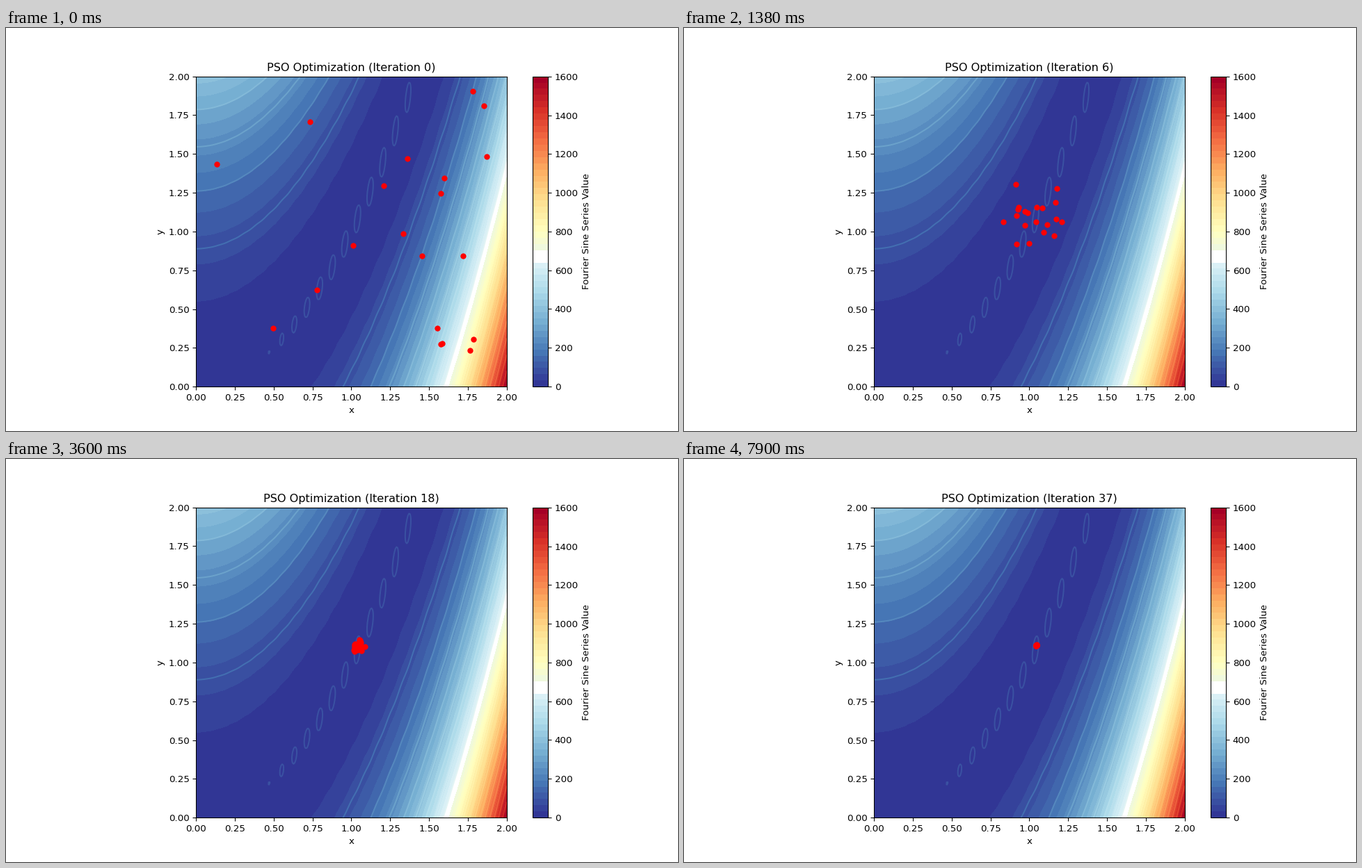
Recreate the animation shown at these times as a matplotlib script. Size 966 by 580 pixels, loop 8000 ms.

```python
import numpy as np
import matplotlib.pyplot as plt
from matplotlib.animation import FuncAnimation
from matplotlib.colors import ListedColormap

LOOP, STEP = 8000, 20
DPI = 96.6
EDGE = 1e-5  # keeps the canvas from rounding down by a pixel
SIZE = (966 + EDGE) / DPI, (580 + EDGE) / DPI

# Where the swarm starts and the point it settles on.
START = np.array([
    (0.134, 1.434), (0.734, 1.705), (1.782, 1.906), (1.853, 1.808),
    (1.871, 1.483), (1.361, 1.472), (1.598, 1.344), (1.576, 1.244),
    (1.211, 1.293), (1.332, 0.984), (1.012, 0.908), (1.453, 0.843),
    (1.721, 0.843), (0.779, 0.623), (0.497, 0.377), (1.553, 0.375),
    (1.587, 0.279), (1.578, 0.272), (1.786, 0.305), (1.764, 0.234)])
BEST = np.array([1.046, 1.111])
SWING = np.random.default_rng(4).uniform(0.25, 0.9, START.shape)


def surface(x, y):
    """Curved valley with a fast ripple that deepens along x."""
    ripple = 0.63 * x * np.cos(2 * np.pi * (x - 0.470) / 0.0814)
    return (1 - x) ** 2 + 100 * (y - x ** 2) ** 2 - ripple


def draw_backdrop(fig):
    """Draw the static plot, return its pixels and the axes box."""
    ax = fig.add_subplot()
    x, y = np.meshgrid(np.linspace(0, 2, 300), np.linspace(0, 2, 300))
    z = surface(x, y)

    bands = plt.get_cmap("RdYlBu_r")(np.linspace(0, 1, 50))
    bands[20:22] = 1
    fill = ax.contourf(x, y, z, levels=np.linspace(z.min(), z.max(), 51),
                       cmap=ListedColormap(bands))
    ax.contour(x, y, z, levels=np.arange(-80, 1681, 80), cmap="RdYlBu_r")
    ax.set_aspect("equal")
    ax.set_xlabel("x")
    ax.set_ylabel("y")
    fig.colorbar(fill, ax=ax, ticks=range(0, 1601, 200),
                 label="Fourier Sine Series Value")
    fig.canvas.draw()
    return np.array(fig.canvas.buffer_rgba()), ax.get_position()


def iteration(ms):
    """Five iterations a second, slowing to four once the swarm settles."""
    return np.interp(ms, [0, 4800, 6420, 7900, 8147], [0, 24, 31, 37, 38])


def swarm(it):
    """Each particle swings about the best point and closes in on it."""
    return BEST + (START - BEST) * np.cos(SWING * it) * np.exp(-0.3 * it ** 0.8)


fig = plt.figure(figsize=SIZE, dpi=DPI)
pixels, box = draw_backdrop(fig)
fig.clear()
fig.figimage(pixels, zorder=0)

ax = fig.add_axes(box, xlim=(0, 2), ylim=(0, 2), zorder=1)
ax.axis("off")
title = ax.set_title("")
dots, = ax.plot([], [], "o", color="red", ms=6.2, mew=0)


def update(frame):
    it = iteration(frame * STEP)
    dots.set_data(*swarm(it).T)
    title.set_text(f"PSO Optimization (Iteration {int(it + 1e-6)})")
    return dots, title


anim = FuncAnimation(fig, update, frames=LOOP // STEP, interval=STEP,
                     repeat=True, repeat_delay=0)
plt.show()
```
